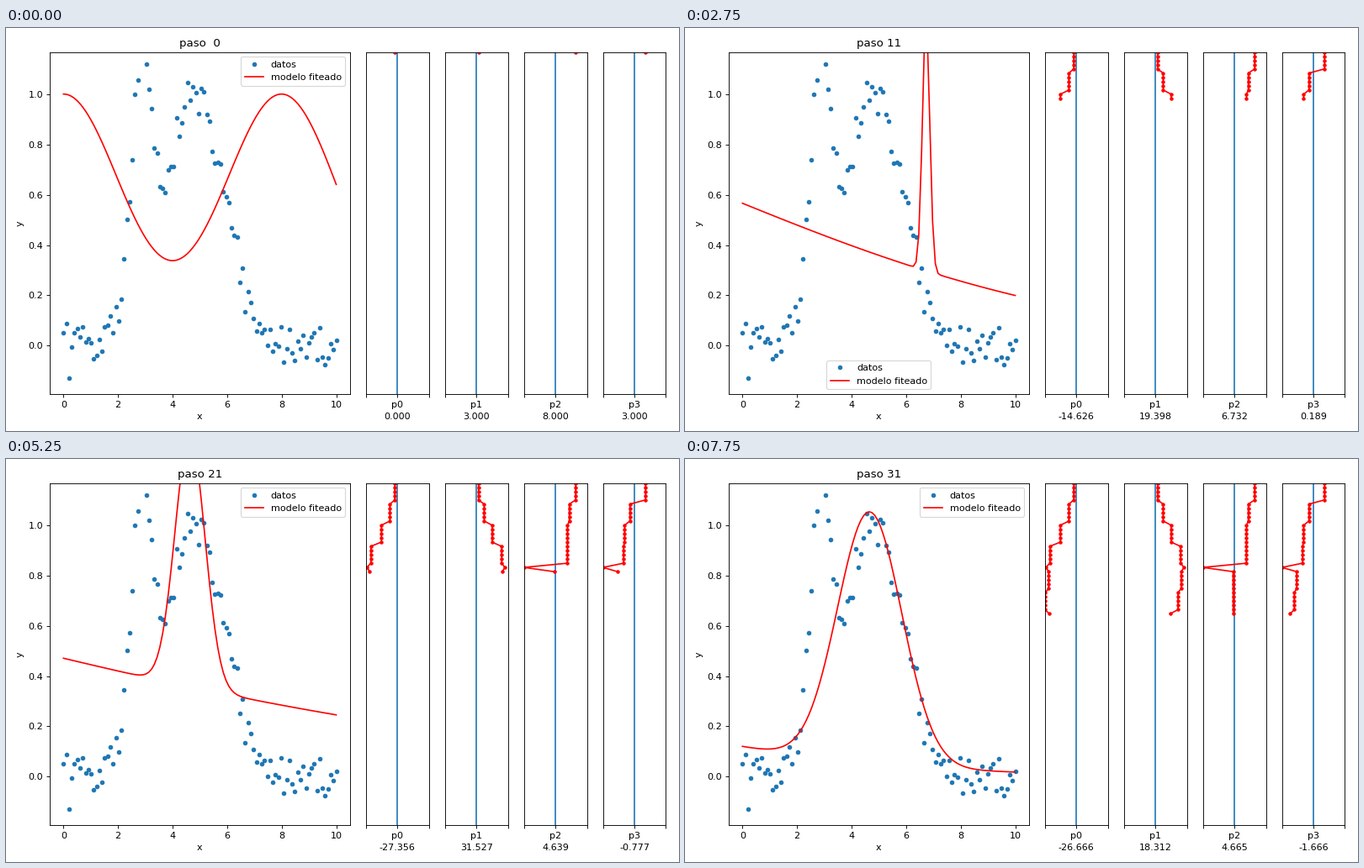
Recreate the animation shown at these times as a matplotlib script. Size 800 by 480 pixels, loop 8 s.

```python
import matplotlib.pyplot as plt
import numpy as np
from matplotlib.animation import FuncAnimation

W, H, DPI = 800, 480, 80
STEPS, INTERVAL = 32, 250
TOP, BOTTOM = 28.6, 435.8
LEFT, PITCH, PANEL_W = 52.1, 93.93, 74.85

# Parameters: center and width of the first bump, then of the second
TRUE = (2.83, 0.55, 4.848, 1.5)
REACH = (34.37, 37.9, 4.9, 4.24)  # half range of each parameter panel
NOISE = 0.05

# Points tried by the fit; an accepted one is evaluated five times,
# once for itself and once for each of its derivatives
ACCEPTED = 5
TRIALS = [
    (ACCEPTED, (0, 3, 8, 3)),
    (ACCEPTED, (-5.307, 9.955, 6.999, 0.885)),
    (ACCEPTED, (-14.626, 19.398, 6.732, 0.189)),
    (ACCEPTED, (-26.189, 30.771, 6.711, 0.017)),
    (1, (-30.412, 35.018, -0.050, -2.736)),
    (ACCEPTED, (-27.356, 31.527, 4.639, -0.777)),
    (ACCEPTED, (-31.490, 27.704, 4.652, -1.074)),
    (1, (-26.666, 18.312, 4.665, -1.666)),
]
PARAMS = np.array([p for count, p in TRIALS for _ in range(count)])


def bump(x, center, width):
    return np.exp(-((x - center) / width) ** 2)


def model(x, p):
    return bump(x, *p[:2]) + bump(x, *p[2:])


def add_axes(left, width):
    return fig.add_axes([left / W, 1 - BOTTOM / H, width / W, (BOTTOM - TOP) / H])


fig = plt.figure(figsize=(W / DPI, H / DPI), dpi=DPI)
x = np.linspace(0, 10, 100)
samples = model(x, TRUE) + np.random.default_rng(6).normal(0, NOISE, x.size)

main = add_axes(LEFT, 3 * PITCH + PANEL_W)
main.plot(x, samples, "o", ms=4, label="datos")
curve, = main.plot(x, model(x, PARAMS[0]), "r-", label="modelo fiteado")
main.set(xlim=(-0.5, 10.5), ylim=(-0.192, 1.168), xlabel="x", ylabel="y")
title = main.set_title("")
legend = main.legend(loc="upper right")

panels, trails = [], []
for i, (center, reach) in enumerate(zip(TRUE, REACH)):
    ax = add_axes(LEFT + (4 + i) * PITCH, PANEL_W)
    ax.axvline(center)
    trails.append(ax.plot([], [], "r.-")[0])
    ax.set(xlim=(center - reach, center + reach), ylim=(81, 0), yticks=[])
    panels.append(ax)


def update(step):
    p = PARAMS[step]
    title.set_text(f"paso {step:2d}")
    curve.set_ydata(model(x, p))
    # The legend steps aside while the peak crosses its corner
    legend.set_loc("lower center" if 5 <= step < 15 else "upper right")
    for i, (ax, trail) in enumerate(zip(panels, trails)):
        trail.set_data(PARAMS[:step + 1, i], np.arange(step + 1))
        low, high = ax.get_xlim()
        ax.set_xticks([low, TRUE[i], high],
                      labels=["", f"p{i}\n{p[i]:.3f}", ""], linespacing=1.55)
    return []


anim = FuncAnimation(fig, update, frames=STEPS, interval=INTERVAL,
                     repeat=True, repeat_delay=0, blit=False)
plt.show()
```
